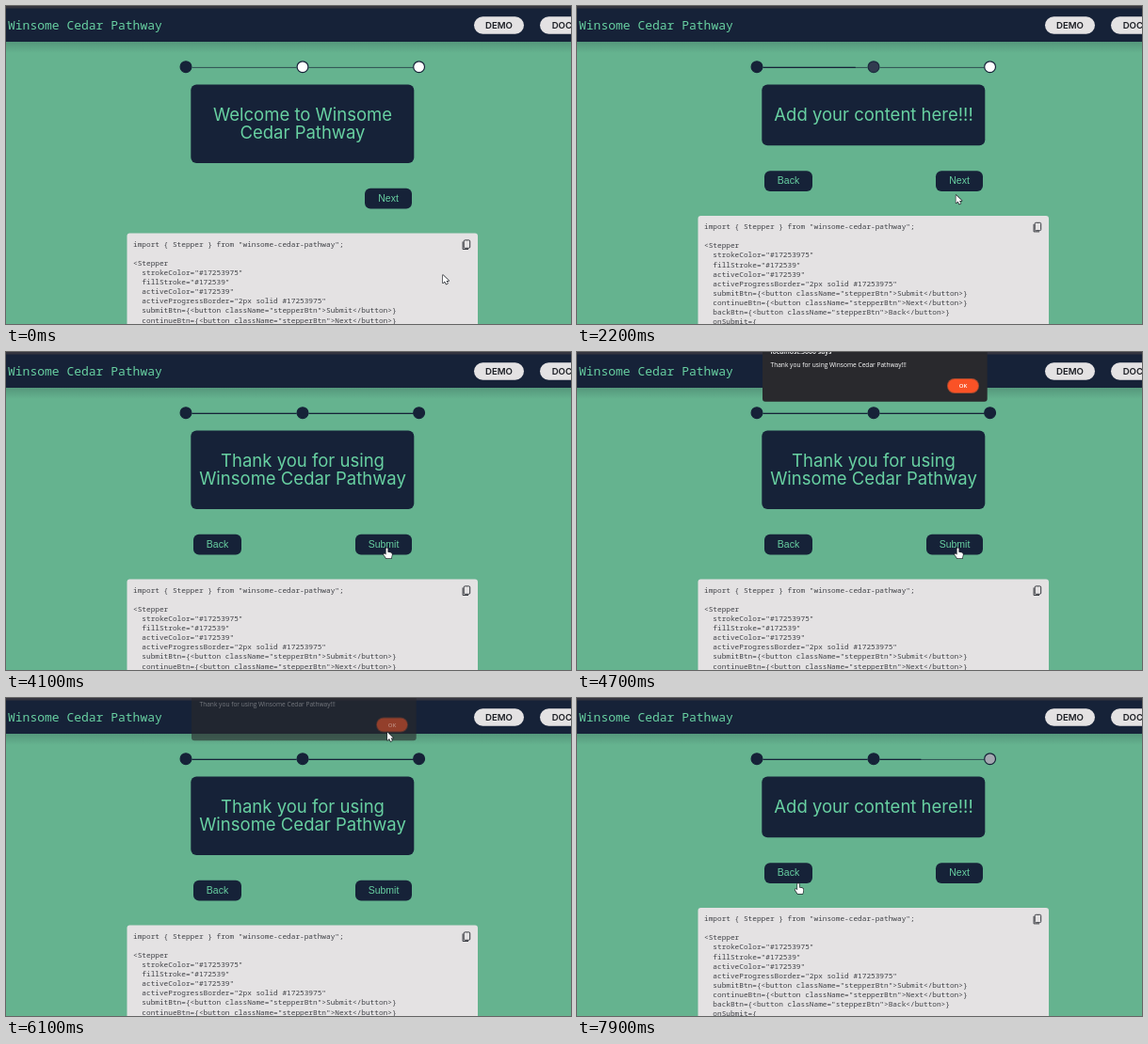
An HTML page with a canvas for the animation above (8 s loop, 600 by 338 pixels).

```html
<!DOCTYPE html>
<html lang="en">
<head>
<meta charset="utf-8">
<title>Stepper demo</title>
<style>
html, body { margin: 0; width: 100%; height: 100%; overflow: hidden; background: #65b38f; }
canvas { display: block; width: 600px; height: 338px; }
</style>
</head>
<body>
<canvas id="stage" width="600" height="338"></canvas>
<script>
const ctx = document.getElementById('stage').getContext('2d');
const LOOP = 8000, TICK = 100;
const NAVY = '#162238', MINT = '#68d1a2', PAGE = '#65b38f', PAPER = '#e4e2e3';
const MONO = '"Noto Sans Mono", monospace';
const ROUND = 'Inter, sans-serif';
const ARIAL = '"Liberation Sans", Arial, sans-serif';
const UI = '"Open Sans", sans-serif';

const CODE = [
  'import { Stepper } from "winsome-cedar-pathway";',
  '',
  '<Stepper',
  '  strokeColor="#17253975"',
  '  fillStroke="#172539"',
  '  activeColor="#172539"',
  '  activeProgressBorder="2px solid #17253975"',
  '  submitBtn={<button className="stepperBtn">Submit</button>}',
  '  continueBtn={<button className="stepperBtn">Next</button>}',
  '  backBtn={<button className="stepperBtn">Back</button>}',
  '  onSubmit={'
];

const next = { label: 'Next', x: 381, w: 50 };
const back = { label: 'Back', x: 199, w: 51 };
const submit = { label: 'Submit', x: 371, w: 60 };
const STEPS = [
  { lines: ['Welcome to Winsome', 'Cedar Pathway'], buttons: [next], shift: 0 },
  { lines: ['Add your content here!!!'], buttons: [back, next], shift: -18.6 },
  { lines: ['Thank you for using', 'Winsome Cedar Pathway'], buttons: [back, submit], shift: 0 }
];

// Pointer stops: time, x, y
const POINTER = [
  [0, 464, 286], [900, 403.5, 204], [1000, 403.5, 204], [1400, 402.5, 201],
  [2400, 402.5, 201], [2900, 402, 188.5], [3200, 402, 188.5], [3900, 404.5, 208],
  [5100, 404.5, 208], [5900, 405, 36.5], [6100, 405, 36.5], [6900, 245, 208],
  [7300, 235, 196.7], [8000, 235, 196.7]
];

const clamp = v => Math.max(0, Math.min(1, v));
const mix = (a, b, p) => a + (b - a) * p;
const smooth = p => p * p * (3 - 2 * p);

// The CSS "ease" curve, cubic-bezier(.25, .1, .25, 1)
function ease(x) {
  x = clamp(x);
  const bez = (a, b, u) => 3 * a * u * (1 - u) ** 2 + 3 * b * u * u * (1 - u) + u ** 3;
  let lo = 0, hi = 1;
  for (let i = 0; i < 20; i++) {
    const mid = (lo + hi) / 2;
    if (bez(.25, .25, mid) < x) lo = mid; else hi = mid;
  }
  return bez(.1, 1, lo);
}

function box(x, y, w, h, r, fill) {
  ctx.beginPath();
  ctx.roundRect(x, y, w, h, r);
  ctx.fillStyle = fill;
  ctx.fill();
}

function text(s, x, y, font, color, align = 'left') {
  ctx.font = font;
  ctx.fillStyle = color;
  ctx.textAlign = align;
  ctx.fillText(s, x, y);
}

function line(x1, x2, y, width, color) {
  ctx.beginPath();
  ctx.moveTo(x1, y);
  ctx.lineTo(x2, y);
  ctx.lineWidth = width;
  ctx.strokeStyle = color;
  ctx.stroke();
}

function drawHeader() {
  const shade = ctx.createLinearGradient(0, 38, 0, 50);
  shade.addColorStop(0, 'rgba(20,40,45,.2)');
  shade.addColorStop(1, 'rgba(20,40,45,0)');
  ctx.fillStyle = shade;
  ctx.fillRect(0, 38, 600, 12);
  ctx.fillStyle = NAVY;
  ctx.fillRect(0, 0, 600, 38);
  ctx.fillStyle = '#34343f';
  ctx.fillRect(0, 0, 600, 2.5);
  text('Winsome Cedar Pathway', 2, 25.3, `500 13px ${MONO}`, MINT);
  [['DEMO', 497], ['DOCS', 567]].forEach(([label, x]) => {
    box(x, 11.2, 53, 18.6, 9.3, PAPER);
    text(label, x + 26.5, 23.7, `600 9.6px ${ROUND}`, '#1c1e24', 'center');
  });
}

function drawDot(x, fill, border) {
  ctx.beginPath();
  ctx.arc(x, 64.7, 5.9, 0, 7);
  ctx.fillStyle = `rgb(${mix(255, 22, fill)},${mix(255, 34, fill)},${mix(255, 56, fill)})`;
  ctx.fill();
  ctx.globalAlpha = border;
  ctx.lineWidth = 1.2;
  ctx.strokeStyle = NAVY;
  ctx.stroke();
  ctx.globalAlpha = 1;
}

function drawProgress(t, step) {
  const first = ease((t - 1600) / 1000);
  const second = t < 7500 ? ease((t - 3050) / 1000) : 1 - ease((t - 7550) / 1000);
  [first, second].forEach((p, i) => {
    const x = 197.5 + 124 * i;
    line(x, x + 111, 65.4, 1, 'rgba(23,37,57,.7)');
    if (p > 0) line(x, x + 111 * p, 65.4, 1.2, NAVY);
  });
  drawDot(191, 1, 1);
  drawDot(315, first, step === 1 && t < 7500 ? first : 1);
  drawDot(438.6, second, step === 2 ? second : 1);
}

function drawCard({ lines, buttons, shift }) {
  box(196.3, 83.5, 237, 83.4 + shift, 6, NAVY);
  lines.forEach((s, i) => text(s, 315, 122 + 18.6 * i, `18.5px ${ROUND}`, MINT, 'center'));
  buttons.forEach(({ label, x, w }) => {
    box(x, 193.8 + shift, w, 21.7, 6, NAVY);
    text(label, x + w / 2, 207.8 + shift, `10.5px ${ARIAL}`, MINT, 'center');
  });
}

function drawCode(shift) {
  box(128.5, 241.5 + shift, 372.5, 140, 3, PAPER);
  CODE.forEach((s, i) => text(s, 135, 255.7 + shift + 10.1 * i, `7.78px ${MONO}`, '#3f4146'));
  ctx.strokeStyle = '#36383e';
  ctx.lineWidth = 1;
  ctx.beginPath();
  ctx.roundRect(486.2, 248.9 + shift, 6.5, 8.4, 1.2);
  ctx.moveTo(485.1, 250.5 + shift);
  ctx.lineTo(485.1, 258.5 + shift);
  ctx.lineTo(491, 258.5 + shift);
  ctx.stroke();
}

// The panel lingers a little longer than its contents while fading
function drawAlert(t) {
  const shown = t < 5500 ? clamp((t - 4200) / 200) : 1 - clamp((t - 6000) / 200);
  if (!shown) return;
  ctx.save();
  ctx.translate(0, -15 * (1 - shown));
  ctx.globalAlpha = shown ** .7;
  box(197, -20, 238.7, 72.8, 3, '#29292d');
  ctx.globalAlpha = shown ** 1.4;
  text('localhost:3000 says', 205.5, 1.6, `600 7px ${UI}`, '#fff');
  text('Thank you for using Winsome Cedar Pathway!!!', 205.5, 16.3, `500 6.6px ${UI}`, '#fff');
  box(393, 28, 34, 16, 8, '#a84a2e');
  box(393.9, 28.9, 32.2, 14.2, 7.1, '#fa5226');
  text('OK', 410, 38.2, `600 6px ${UI}`, '#fff', 'center');
  ctx.restore();
}

function pointerAt(t) {
  const i = POINTER.findIndex(stop => stop[0] > t);
  const [t0, x0, y0] = POINTER[i - 1], [t1, x1, y1] = POINTER[i];
  const p = smooth((t - t0) / (t1 - t0));
  return [mix(x0, x1, p), mix(y0, y1, p)];
}

function drawPointer(x, y, { buttons, shift }) {
  const top = 193.8 + shift;
  const hand = buttons.some(b => x >= b.x && x <= b.x + b.w && y >= top && y <= top + 21.7);
  const shape = new Path2D(hand
    ? 'M-.9 1Q0-.6 .9 1V4.7L3.8 5.3Q5.6 5.7 5.4 7.5L4.6 11.3H-.6L-3.4 7.4Q-3.4 5.8-1.8 6.7L-.9 7.5Z'
    : 'M0 0V8.4L2 6.6L3.5 9.6L5 8.8L3.6 6H6.2Z');
  ctx.save();
  ctx.translate(x, y);
  ctx.lineJoin = 'round';
  ctx.lineWidth = 1.3;
  ctx.strokeStyle = '#22262c';
  ctx.stroke(shape);
  ctx.fillStyle = '#fff';
  ctx.fill(shape);
  ctx.restore();
}

function stepAt(t) {
  if (t < 1600) return 0;
  return t < 3000 || t >= 7500 ? 1 : 2;
}

function draw(t) {
  const index = stepAt(t), step = STEPS[index];
  ctx.fillStyle = PAGE;
  ctx.fillRect(0, 0, 600, 338);
  drawHeader();
  drawProgress(t, index);
  drawCard(step);
  drawCode(step.shift);
  drawAlert(t);
  drawPointer(...pointerAt(t), step);
}

const start = performance.now();
function frame() {
  const t = (performance.now() - start) % LOOP;
  draw(Math.floor(t / TICK) * TICK);
  requestAnimationFrame(frame);
}
frame();
</script>
</body>
</html>
```
